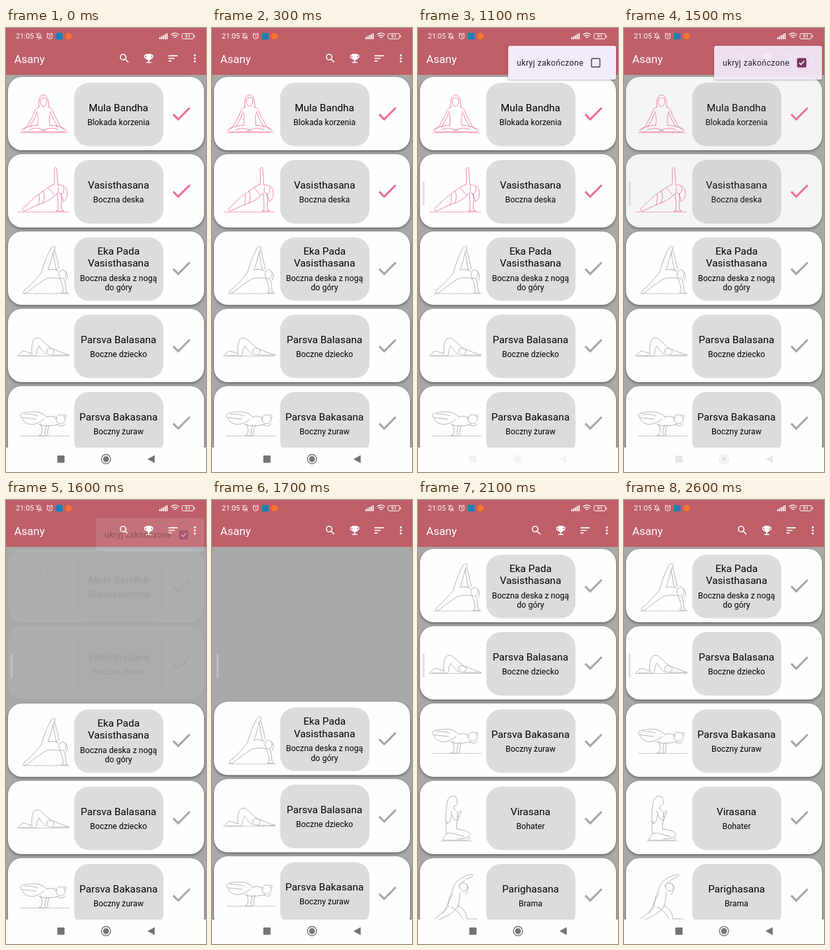
Write an HTML page that moves like this. It is 304 px wide and 672 px high and loops after 3000 ms.

```html
<!DOCTYPE html>
<html lang="pl">
<head>
<meta charset="utf-8">
<title>Asany</title>
<style>
html, body { margin: 0; width: 100%; height: 100%; overflow: hidden; background: #a9a9a9; }
#stage { position: relative; width: 304px; height: 672px; overflow: hidden; background: #a9a9a9; font-family: Roboto, sans-serif; }
#stage > *, .card, .card > * { position: absolute; }
svg { display: block; overflow: visible; }
text { font-family: Roboto, sans-serif; }
#list { left: 0; top: 0; }
.card { left: 3px; top: 0; width: 298px; height: 111px; border-radius: 21px; background: #fefefe; box-shadow: 0 2px 4px rgba(0,0,0,.38), 0 0 2px rgba(0,0,0,.12); }
.box { left: 101px; top: 8.5px; width: 135px; height: 95px; border-radius: 22px; background: #dcdcdc; box-shadow: 0 .5px 1.5px rgba(0,0,0,.22); }
.card svg { left: 0; top: 0; }
.pose { fill: none; stroke-width: .85; stroke-linecap: round; stroke-linejoin: round; }
.name { font-size: 15.5px; text-anchor: middle; }
.sub { font-size: 12.4px; text-anchor: middle; }
#bar, #nav { left: 0; width: 304px; background: #be5f69; }
#bar { top: 0; height: 71px; }
#nav { top: 635px; height: 37px; background: #fefefe; }
#side { left: 7px; top: 232px; width: 3px; height: 37px; border-radius: 2px; background: rgba(205,205,205,.6); }
#menu { left: 137px; top: 27px; width: 164px; height: 51px; transform-origin: 100% 0; }
#menu > * { position: absolute; inset: 0; }
#paper { border-radius: 3px; background: #f3eafa; box-shadow: 0 1px 3px rgba(0,0,0,.3); }
</style>
</head>
<body>
<div id="stage">
  <div id="list"></div>
  <div id="bar">
    <svg width="304" height="71" fill="#fff">
      <text x="15" y="16.3" font-size="11">21:05</text>
      <g fill="none" stroke="#fff" stroke-width="1">
        <path d="M46.5 14.5H53.5C52 13 53 8 50 8S48 13 46.5 14.5M49 16.5H51M45.5 7.5L54.5 17"/>
        <circle cx="66.5" cy="12.5" r="3.9"/>
        <path d="M66.5 10.2V12.800L68.2 13.8M61.8 9.5L64 7.5M71.2 9.5L69 7.5"/>
        <path d="M251 10.2Q257 5.2 263 10.2M253 12.5Q257 9.2 261 12.5M255 14.6Q257 13 259 14.6" stroke-width="1.3"/>
        <rect x="267.5" y="8.5" width="17.5" height="8" rx="2"/>
        <path d="M286.5 11V14"/>
      </g>
      <rect x="76" y="7.5" width="10" height="10" fill="#1683b4"/>
      <circle cx="95" cy="12.5" r="5" fill="#f4742f"/>
      <path d="M233 17V14H234.800V17ZM235.7 17V12.5H237.5V17ZM238.4 17V11H240.2V17ZM241.1 17V9.5H242.9V17ZM243.8 17V8H245.6V17Z"/>
      <text x="276.3" y="15.2" font-size="7.5" font-weight="500" text-anchor="middle">91</text>
      <text x="12.4" y="52.6" font-size="17">Asany</text>
      <circle id="ripple" cx="287" cy="46" r="12" fill="#000"/>
      <g id="icons"></g>
    </svg>
  </div>
  <div id="side"></div>
  <div id="menu">
    <div id="paper"></div>
    <svg id="item" width="164" height="51">
      <text x="13" y="30.3" font-size="12.4" letter-spacing=".387" fill="#1d1b20">ukryj zakończone</text>
      <rect id="tick" x="126.7" y="19.2" width="12.8" height="12.8" rx="1.5" stroke-width="1.5"/>
      <path id="mark" d="M129.5 25.7L132 28.3L137 22.8" fill="none" stroke="#fff" stroke-width="1.5"/>
    </svg>
  </div>
  <div id="nav">
    <svg id="keys" width="304" height="37" fill="#757575">
      <rect x="78" y="12" width="11" height="11" rx="1"/>
      <circle cx="152" cy="17.5" r="7" fill="none" stroke="#757575" stroke-width="1.4"/>
      <circle cx="152" cy="17.5" r="4.5"/>
      <path d="M215 17.5L226 11.5V23.5Z"/>
    </svg>
  </div>
</div>
<script>
const $ = id => document.getElementById(id);
const PINK = '#ee6f94', GREY = '#a6a6a6';
const CHECK = 'M9 16.17L4.83 12l-1.42 1.41L9 19 21 7l-1.41-1.41z';
const PITCH = 117, TOP = 74;

// Line drawings in card coordinates; "ground" is [x1, x2, y].
const cards = [
  { names: ['Mula Bandha'], subs: ['Blokada korzenia'], done: true, ground: [22, 94, 84.5],
    pose: 'M50 46C49 38 50 28 57 27C64 28 65 38 65 46M52 36C52 30 62 30 62 36C62 43 58 45 57 45S52 43 52 36' +
      'M51 45C46 47 44 49 43 54C40 62 35 68 32 76L27 79M64 45C69 47 71 49 72 54C75 62 80 68 83 76L88 79' +
      'M46 55C45 62 40 68 36 76M69 55C70 62 75 68 79 76M47 52C49 60 50 66 48 74M68 52C66 60 65 66 67 74' +
      'M48 73C38 74 28 76 24 80C23 84 30 83 40 83H75C85 83 92 84 91 80C87 76 77 74 67 73M36 80C45 76 52 78 60 82M79 80C70 76 62 78 54 82' },
  { names: ['Vasisthasana'], subs: ['Boczna deska'], done: true, ground: [18, 96, 87.5],
    pose: 'M73 46C74 38 74 30 73 23C74 19 77 19 77 23C78 32 78 40 79 47M73 46C66 48 62 52 56 56C46 62 38 70 28 80C24 82 24 86 28 86' +
      'C38 82 46 77 56 74C62 72 68 68 73 64L79 58M64 51L74 62M56 56C60 62 58 68 56 74M50 61C52 66 50 72 49 77' +
      'M78 60C79 68 79 78 79 84L76 86H88L84 83C84 74 85 66 84 60M79 47C86 45 93 50 93 58C94 64 91 70 87 72C87 66 84 64 83 60' +
      'M80 50C78 55 80 60 84 60C88 59 89 53 87 49' },
  { names: ['Eka Pada', 'Vasisthasana'], subs: ['Boczna deska z nogą', 'do góry'], ground: [25, 97, 94],
    pose: 'M54 62C57 50 62 37 67 28C68 23 74 21 75 24C74 28 72 30 71 33C69 44 66 52 64 58M72 32C73 42 75 52 77 59M74 28C77 38 79 48 81 57' +
      'M54 62C46 72 36 83 28 89C25 92 27 94 31 93C42 84 52 77 60 72M64 58C70 57 74 57 80 60M60 72C68 69 74 70 82 71' +
      'M82 61C84 56 91 57 91 64C92 70 86 73 82 70C80 67 80 63 82 61M90 60C95 64 94 72 91 74M82 71C85 78 87 84 87 90L84 93H94L91 89C91 82 90 78 88 72' },
  { names: ['Parsva Balasana'], subs: ['Boczne dziecko'], ground: [18, 96, 71.5],
    pose: 'M39 68C39 60 39 53 42 47C45 43 51 43 54 47L70 61M46 70C47 62 48 59 50 56C54 62 57 67 62 69' +
      'M62 63C62 59 69 58 72 62C75 66 72 70 66 70C63 69 62 66 62 63M72 61C80 64 88 68 96 70M70 70H96M18 71L25 64C30 64 33 66 40 68M22 71H45' },
  { names: ['Parsva Bakasana'], subs: ['Boczny żuraw'], ground: [22, 96, 75.5],
    pose: 'M62 47C58 42 50 38 40 39C30 39 24 41 22 43C20 46 24 48 28 48L46 50M24 48C26 54 32 58 40 58C48 57 54 53 58 50M28 42C34 43 42 42 48 45' +
      'M50 58C58 62 70 60 80 58M62 47C68 44 74 46 78 49M76 50C76 41 90 41 90 50S76 59 76 50M88 45C90 41 94 45 90 48' +
      'M53 57C54 62 56 66 54 72L50 75H62L59 71C60 66 60 62 62 59M66 59C64 64 62 70 64 74M78 58C84 62 88 60 90 57' },
  { names: ['Virasana'], subs: ['Bohater'], ground: [35, 82, 91],
    pose: 'M57 24C50 21 44 26 44 36C43 46 41 56 43 64C47 66 50 60 51 52M57 24C60 27 59 31 60 33C59 37 57 38 55 38L54 42' +
      'C60 46 62 52 60 58C59 64 58 68 59 73M45 62C42 68 41 74 44 80M50 46C52 54 55 60 60 60L65 48C66 44 63 44 62 48L59 55' +
      'M59 73C68 74 78 76 79 81C79 85 70 88 60 88M44 80C40 84 37 88 38 90H74C79 90 79 86 76 85M44 80C52 77 58 82 70 84' },
  { names: ['Parighasana'], subs: ['Brama'], ground: [24, 96, 94],
    pose: 'M52 50C54 38 64 28 80 25C85 24 84 28 80 29C72 32 66 36 62 42M63 43C63 35 76 36 75 45C74 52 64 52 63 43M73 39C78 42 76 50 72 55' +
      'M52 50C48 58 46 66 46 74M64 52C64 60 62 66 61 72M46 74C40 80 32 87 26 92M61 72C56 82 44 88 30 94' +
      'M61 72C70 76 74 84 74 92H90M53 54C47 62 43 76 38 84M50 74C56 75 64 84 68 92' }
];

function buildCard(c) {
  const color = c.done ? PINK : GREY;
  const [x1, x2, gy] = c.ground;
  const two = c.names.length > 1;
  const lines = (rows, cls, y, step) =>
    rows.map((s, i) => `<text class="${cls}" x="171" y="${y + i * step}">${s}</text>`).join('');
  const el = document.createElement('div');
  el.className = 'card';
  el.innerHTML = `<div class="box"></div>
    <svg width="298" height="111" viewBox="3 0 298 111">
      <g class="pose" stroke="${color}"><path d="${c.pose}"/>
        <path d="M${x1} ${gy}H${x2}" stroke-dasharray="1.2 1.5"/></g>
      ${lines(c.names, 'name', two ? 35 : 51.7, 18.2)}
      ${lines(c.subs, 'sub', two ? 74.8 : 73, 14.5)}
      <path d="${CHECK}" fill="${color}" transform="translate(247.8 37) scale(1.55)"/>
    </svg>`;
  $('list').append(el);
  return el;
}

const icons = [
  [180, 'M15.5 14h-.79l-.28-.27A6.47 6.47 0 0 0 16 9.5 6.5 6.5 0 1 0 9.5 16c1.61 0 3.09-.59 4.23-1.57l.27.28v.79l5 4.99L20.49 19zm-6 0C7 14 5 12 5 9.5S7 5 9.5 5 14 7 14 9.5 12 14 9.5 14z'],
  [217, 'M19 5h-2V3H7v2H5c-1.1 0-2 .9-2 2v1c0 2.55 1.92 4.63 4.39 4.94A5 5 0 0 0 11 15.9V19H7v2h10v-2h-4v-3.1a5 5 0 0 0 3.61-2.96C19.08 12.63 21 10.55 21 8V7c0-1.1-.9-2-2-2zM5 8V7h2v3.82C5.84 10.4 5 9.3 5 8zm14 0c0 1.3-.84 2.4-2 2.82V7h2z'],
  [254, 'M3 18h6v-2H3zM3 6v2h18V6zm0 7h12v-2H3z'],
  [287, 'M12 4a2 2 0 1 0 .01 0zm0 6a2 2 0 1 0 .01 0zm0 6a2 2 0 1 0 .01 0z']
];
$('icons').innerHTML = icons.map(([x, d]) =>
  `<path d="${d}" transform="translate(${x - 9.3} 36.7) scale(.775)"/>`).join('');

const els = cards.map(buildCard);
const ramp = (t, a, b) => Math.min(1, Math.max(0, (t - a) / (b - a)));
const smooth = p => (1 - Math.cos(Math.PI * p)) / 2;

function draw(t) {
  const shift = 2 * PITCH * smooth(ramp(t, 1683, 1933));
  const fade = 1 - ramp(t, 1487, 1608);
  els.forEach((el, i) => {
    const { done } = cards[i];
    el.style.transform = `translateY(${TOP + PITCH * i - (done ? 0 : shift)}px)`;
    el.style.opacity = done ? fade : 1;
  });

  const open = 1 - (1 - ramp(t, 740, 900)) ** 2;
  const close = ramp(t, 1490, 1617);
  const checked = t >= 1400;
  $('menu').style.opacity = open;
  $('menu').style.transform = `scale(${.8 + .2 * open})`;
  $('paper').style.opacity = 1 - close;
  $('item').style.opacity = Math.sqrt(1 - close);
  $('tick').setAttribute('fill', checked ? '#75305f' : 'none');
  $('tick').setAttribute('stroke', checked ? '#75305f' : '#49454f');
  $('mark').style.opacity = checked ? 1 : 0;

  $('ripple').style.opacity = t >= 600 && t < 900 ? .14 : 0;
  $('side').style.opacity = ramp(t, 500, 800);
  $('keys').style.opacity = 1 - .93 * (ramp(t, 550, 700) - ramp(t, 1490, 1600));
}

function tick() {
  draw(Math.floor(performance.now() % 3000 / 100) * 100);
  requestAnimationFrame(tick);
}
tick();
</script>
</body>
</html>
```
